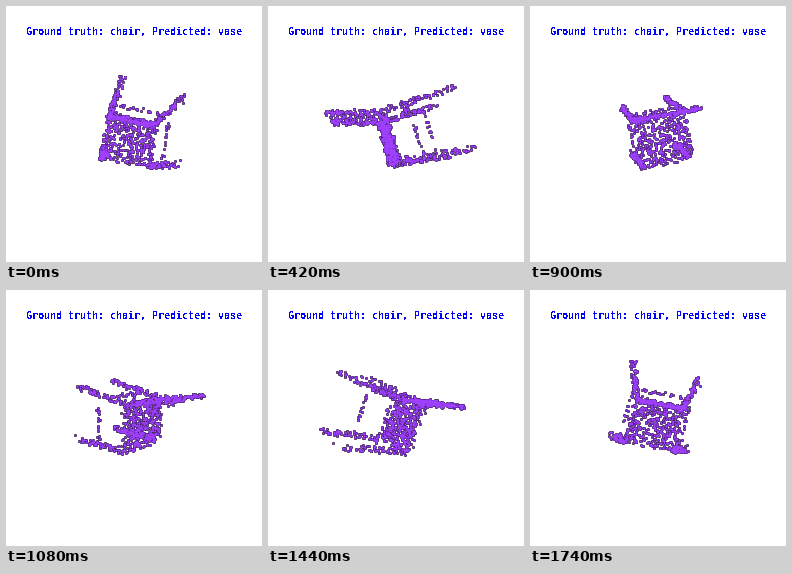
A matplotlib script for the animation above (1800 ms loop, 256x256 px).

```python
import numpy as np
import matplotlib.pyplot as plt
from matplotlib.animation import FuncAnimation

SIZE, DPI = 256, 64
FRAMES, STEP_MS = 30, 60
PX = 72 / DPI            # points per pixel
CAMERA = 255             # camera distance in pixels
START = np.radians(12)
TILT, ROLL = np.arcsin(0.24), np.arcsin(0.18)

rng = np.random.default_rng(7)


def jitter(n, r):
    return np.array(r) * rng.uniform(-1, 1, (n, 3))


def bar(a, b, n, r):
    """Points scattered through a bar from a to b."""
    a, b = np.array(a, float), np.array(b, float)
    return a + (b - a) * rng.random((n, 1)) + jitter(n, r)


def slab(origin, side, up, n, r):
    """Points scattered through a parallelogram."""
    origin, side, up = (np.array(v, float) for v in (origin, side, up))
    s, t = rng.random((2, n, 1))
    return origin + side * s + up * t + jitter(n, r)


def chair():
    # axes: across the seat, seat depth, along the legs
    parts = [
        slab((-31, -29, -10), (54, 0, 0), (3, 50, 0), 430, (1, 1, 4.5)),
        slab((-27, 20, -10), (52, 0, 0), (1, 12, -51), 170, 1.5),
    ]
    for side in (-1, 1):
        rear = np.array([(25 * side - 1, 20, -10), (28 * side, 26, 62)])
        front = np.array([(25 * side - 4, -27, -10), (28 * side - 4, -34, 62)])
        parts.append(bar(*rear, 75, 2.8))
        parts.append(bar(*front, 75, 2.8))
        # back post and side stretcher
        parts.append(bar((25 * side, 20, -10), (23 * side + 2, 32, -61), 40, 1.8))
        parts.append(bar(rear.mean(axis=0), front.mean(axis=0), 17, 1.4))
    parts.append(bar((-25, 21, 15), (25, 21, 15), 24, 2))
    return np.vstack(parts)


def lean(p):
    """Tip the chair off the turning axis."""
    u, h, v = p.T
    y = h * np.cos(TILT) + v * np.sin(TILT)
    z = v * np.cos(TILT) - h * np.sin(TILT)
    x = u * np.cos(ROLL) + y * np.sin(ROLL)
    y = y * np.cos(ROLL) - u * np.sin(ROLL)
    return x, y, z


X, Y, Z = lean(chair())


def project(angle):
    c, s = np.cos(angle), np.sin(angle)
    x, near = X * c + Z * s, Z * c - X * s
    zoom = CAMERA / (CAMERA - near)
    return np.column_stack([SIZE / 2 + x * zoom, SIZE / 2 - Y * zoom])


fig = plt.figure(figsize=(SIZE / DPI, SIZE / DPI), dpi=DPI, facecolor="white")
ax = fig.add_axes([0, 0, 1, 1])
ax.set_xlim(0, SIZE)
ax.set_ylim(SIZE, 0)
ax.axis("off")

ax.text(19.5, 29.5, "Ground truth: chair, Predicted: vase", color="#0000ff",
        family="DejaVu Sans Mono", weight="bold", size=10 * PX,
        ha="left", va="baseline", antialiased=False)


def dots(color, width):
    return ax.scatter(*project(START).T, s=(width * PX) ** 2, c=color,
                      linewidths=0, antialiased=False)


# outlines lie under all fills, so crowded parts read as solid purple
layers = dots("black", 3.0), dots("#a040ff", 2.2)


def draw(i):
    pts = project(START + 2 * np.pi * i / FRAMES)
    for layer in layers:
        layer.set_offsets(pts)
    return layers


anim = FuncAnimation(fig, draw, frames=FRAMES, interval=STEP_MS,
                     repeat=True, repeat_delay=0, blit=False)
plt.show()
```
